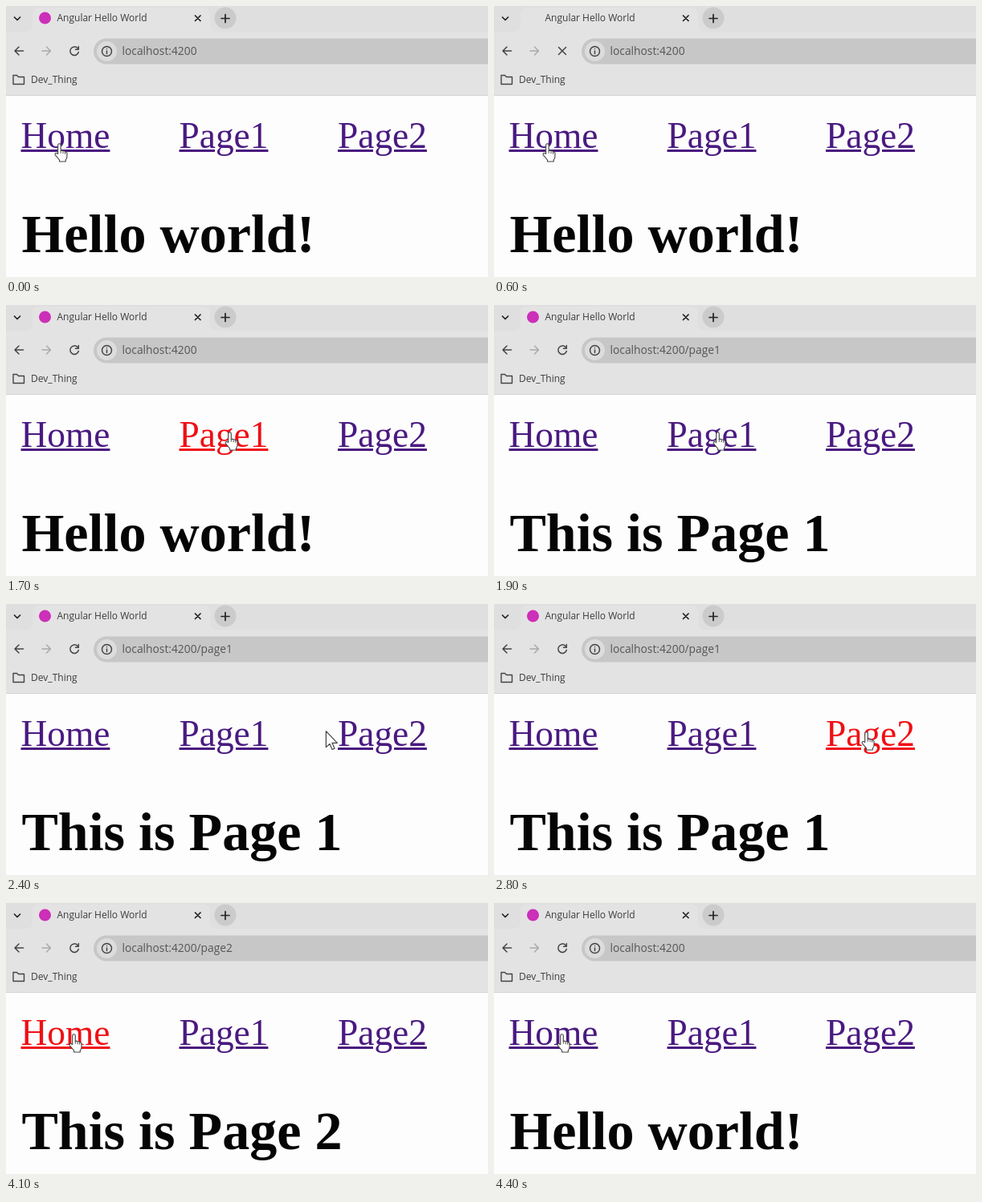
Write an HTML page that moves like this. It is 600 px wide and 338 px high and loops after 4.5 s.

```html
<!DOCTYPE html>
<html lang="en">
<head>
<meta charset="utf-8">
<title>Angular Hello World</title>
<style>
  html, body { margin: 0; width: 100%; height: 100%; overflow: hidden; background: #fdfdfd; }
  #stage { position: relative; width: 600px; height: 338px; overflow: hidden; }
  svg { position: absolute; left: 0; top: 0; }
  .text { position: absolute; line-height: 0; white-space: pre; }
  .ui { font: 12px/0 "Open Sans", "Noto Sans", sans-serif; color: #3c3c3c; }
  .url { font-size: 13.8px; color: #555; }
  .link {
    top: 162px; font: 45.4px/0 "Liberation Serif", "Times New Roman", serif; color: #4a1a80;
    text-decoration: underline; text-decoration-thickness: 3px; text-underline-offset: 2px;
  }
  .link.active { color: #f00f14; }
  #heading {
    left: 19.4px; top: 284px; margin: 0; color: #050505;
    font: bold 68.1px/0 "Liberation Serif", "Times New Roman", serif;
  }
  .icon { fill: none; stroke: #444; stroke-width: 1.5; stroke-linecap: round; stroke-linejoin: round; }
  .cursor { fill: #fff; stroke: #444; stroke-width: 1.2; stroke-linejoin: round; }
</style>
</head>
<body>
<div id="stage">
  <svg width="600" height="338">
    <rect width="600" height="111" fill="#dfdfdf"/>
    <path d="M0 32H24Q33 32 33 23V11Q33 2 42 2H245Q254 2 254 11V23Q254 32 263 32H600V111H0Z" fill="#e4e3e4"/>
    <path d="M0 111.500H600" stroke="#d3d3d3"/>
    <circle cx="273" cy="15" r="13.500" fill="#cbcbcb"/>
    <path d="M600 40.500H125A16 16 0 0 0 125 72.500H600Z" fill="#c7c7c7"/>
    <circle cx="125.500" cy="56.500" r="12.500" fill="#dcdcdc"/>
    <circle id="favicon" cx="48.500" cy="15" r="7.500" fill="#cc2fb8"/>
    <g class="icon">
      <path d="M10.500 14L14 17.500L17.500 14M235.500 12L242 18.500M242 12L235.500 18.500M268 15.500H278M273 10.500V20.500" stroke="#222" stroke-width="1.700"/>
      <path d="M21.500 56H11.500M16 51L11 56L16 61"/>
      <path d="M45 56H55M50.500 51L55.500 56L50.500 61" stroke="#aaa"/>
      <path id="reload" d="M89 52.500A5.300 5.300 0 1 0 90.300 57.500M90.300 50.500V54.200H86.500"/>
      <path id="stop" d="M80.500 51.500L89.500 60.500M89.500 51.500L80.500 60.500"/>
      <circle cx="125.500" cy="56.500" r="6"/>
      <path d="M125.500 56V59.500M125.500 53.500V53.600"/>
      <path d="M9 86.500H13.500L15.500 88.500H22.500V97.500H9Z" stroke-width="1.400"/>
    </g>
  </svg>
  <span class="text ui" style="left:63.5px;top:15px">Angular Hello World</span>
  <span class="text ui url" id="url" style="left:144.5px;top:55.5px"></span>
  <span class="text ui" style="left:31px;top:91.5px">Dev_Thing</span>
  <span class="text link" style="left:18.5px">Home</span>
  <span class="text link" style="left:215.5px">Page1</span>
  <span class="text link" style="left:413px">Page2</span>
  <h1 class="text" id="heading"></h1>
  <svg width="600" height="338">
    <g id="pointer" class="cursor">
      <g id="hand" transform="translate(-6 .5) scale(.94)">
        <path d="M4.500 14V2.200a1.900 1.900 0 0 1 3.800 0V9.500q1.800-1 3 .6 1.900-.7 2.800.9 2.300-.3 2.400 1.900v4.600q0 2.400-1.800 4.200V24H6.500v-2.200L1 15.200q-.9-1.800.7-2.400 1.200-.3 2.800 1.200"/>
        <path d="M8.300 9.500V13M11.300 10.500V13.500M14 11.300V14" fill="none" stroke-width="1"/>
      </g>
      <path id="arrow" d="M0 0V20L4.600 15.800L7.700 22.800L10.700 21.500L7.600 14.700H14Z"/>
    </g>
  </svg>
</div>
<script>
  const LOOP = 4500, STEP = 100;
  const $ = id => document.getElementById(id);
  const links = [...document.querySelectorAll('.link')];
  const linkSpans = [[19, 129], [216, 326], [414, 524]];

  // Start time, address path, heading
  const pages = [
    [0, '', 'Hello world!'],
    [1900, '/page1', 'This is Page 1'],
    [3000, '/page2', 'This is Page 2'],
    [4300, '', 'Hello world!']
  ];
  // Press time, load time, end time, link index
  const clicks = [
    [400, 600, 800, 0],
    [1600, 1800, 1900, 1],
    [2800, 2900, 3000, 2],
    [4100, 4200, 4300, 0]
  ];
  // Time, x, y of the pointer tip
  const path = [
    [0, 66.4, 171], [700, 66.4, 171], [1200, 278.5, 158], [2100, 278.5, 158],
    [2600, 463.5, 159], [3500, 463.5, 159], [4000, 84.5, 163], [LOOP, 84.5, 163]
  ];

  const ease = k => k * k * (3 - 2 * k);
  const show = (el, on) => { el.style.display = on ? '' : 'none'; };

  function tipAt(t) {
    const i = path.findIndex(p => p[0] > t);
    const [t0, x0, y0] = path[i - 1], [t1, x1, y1] = path[i];
    const k = ease((t - t0) / (t1 - t0));
    return [x0 + (x1 - x0) * k, y0 + (y1 - y0) * k];
  }

  function draw(t) {
    const [, route, title] = pages.filter(p => p[0] <= t).pop();
    $('url').textContent = 'localhost:4200' + route;
    $('heading').textContent = title;

    const click = clicks.find(c => t >= c[0] && t < c[2]);
    const loading = !!click && t >= click[1];
    links.forEach((el, i) => el.classList.toggle('active', !!click && !loading && click[3] === i));
    show($('favicon'), !loading);
    show($('reload'), !loading);
    show($('stop'), loading);

    const [x, y] = tipAt(t);
    const over = linkSpans.some(([a, b]) => x >= a && x <= b);
    show($('hand'), over);
    show($('arrow'), !over);
    $('pointer').setAttribute('transform', `translate(${x} ${y})`);
  }

  const start = performance.now();
  function tick() {
    const t = (performance.now() - start) % LOOP;
    draw(Math.floor(t / STEP) * STEP);
    requestAnimationFrame(tick);
  }
  tick();
</script>
</body>
</html>
```
